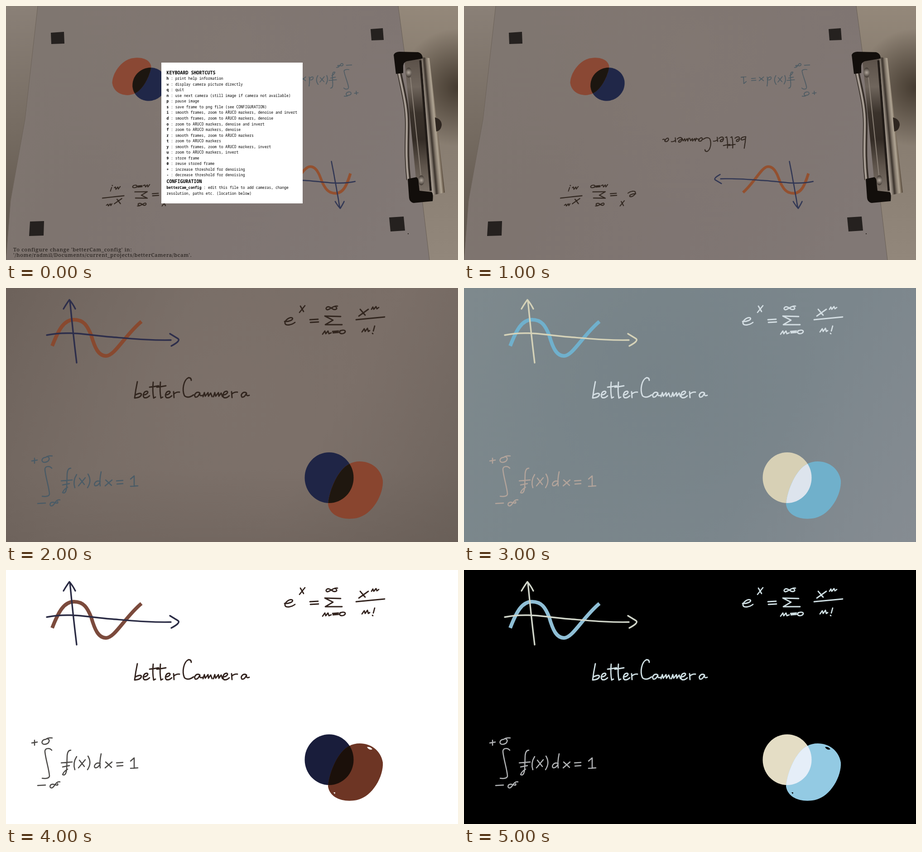
Write an HTML page with a canvas that moves like this. It is 998x561 px and loops after 6 s.

```html
<!DOCTYPE html>
<html lang="en">
<head>
<meta charset="utf-8">
<title>Whiteboard camera</title>
<style>
  html, body { margin: 0; width: 100%; height: 100%; overflow: hidden; background: #000; }
  canvas, svg { position: absolute; left: 0; top: 0; }
  #ink { transform-origin: 0 0; }
  text { white-space: pre; }
  .row { font: 500 8.03px "Noto Sans Mono", "DejaVu Sans Mono", monospace; fill: #000; }
  .head { font: bold 10px "Noto Sans Mono", "DejaVu Sans Mono", monospace; fill: #000; }
  .path { font: 11.5px "Noto Serif", "Liberation Serif", serif; letter-spacing: .7px; fill: #1c1714; }
  .key { font-weight: bold; }
</style>
</head>
<body>
<canvas id="back" width="998" height="561"></canvas>
<canvas id="ink" width="998" height="561"></canvas>
<svg id="help" width="998" height="561"></svg>
<script>
const W = 998, H = 561;
const backEl = document.getElementById('back');
const inkEl = document.getElementById('ink');
const help = document.getElementById('help');
const back = backEl.getContext('2d');
const ink = inkEl.getContext('2d');

// Where the four corners of the sheet appear in the camera picture
const sheet = [[846, 466], [86, 475], [128, 84], [806, 76]];

function perspective([[x0, y0], [x1, y1], [x2, y2], [x3, y3]]) {
  const dx1 = x1 - x2, dx2 = x3 - x2, sx = x0 - x1 + x2 - x3;
  const dy1 = y1 - y2, dy2 = y3 - y2, sy = y0 - y1 + y2 - y3;
  const den = dx1 * dy2 - dx2 * dy1;
  const g = (sx * dy2 - dx2 * sy) / den, h = (dx1 * sy - sx * dy1) / den;
  const m = [
    (x1 - x0 + g * x1) / W, (y1 - y0 + g * y1) / W, 0, g / W,
    (x3 - x0 + h * x3) / H, (y3 - y0 + h * y3) / H, 0, h / H,
    0, 0, 1, 0, x0, y0, 0, 1
  ];
  return `matrix3d(${m.map(v => v.toFixed(10)).join()})`;
}
const cameraView = perspective(sheet);

// Handwriting
const axes = 'M90 104C140 94 180 104 230 108S320 116 364 115M362 101L380 112Q386 117 365 128' +
  'M141 27Q148 100 156 165M127 46Q134 34 140 26Q147 34 153 46';
const wave = 'M102 128C116 92 128 70 150 70C172 70 180 84 188 104C196 132 204 150 221 150C240 150 262 105 299 74';
const series = [
  'M615 74C624 75 636 70 632 66C626 63 615 72 616 78C618 84 630 82 638 76',
  'M650 40L657 52M660 39L648 54M671 70L689 69M672 76L690 75',
  'M739 63L704 62L722 71L705 81L742 81',
  'M732 40C722 38 716 48 709 48C704 46 708 40 714 42C722 46 724 50 730 46Q731 42 726 41',
  'M699 102L704 95L706 101L711 95L713 101L718 99M721 96L734 95M722 99L734 98',
  'M738 94C732 102 746 103 749 97C750 92 741 92 737 96',
  'M782 47L793 60M800 47L779 62M807 47L810 42L812 47L817 41L819 46L823 43M773 70L836 64',
  'M786 97L791 90L793 96L798 89L800 96L803 94M814 84L811 95M809 100L810 101'
].join('');
const integral = [
  'M57 382L69 380M63 376L63 387M102 371Q92 370 88 374C78 374 76 386 86 385C96 384 98 374 92 373',
  'M101 398C96 392 85 393 86 402C88 420 95 440 96 455Q95 462 80 460',
  'M70 476L87 475M119 468C110 466 108 478 102 481C96 483 95 474 103 473C110 474 116 478 114 472',
  'M143 398Q136 398 135 410L134 440Q132 456 125 452Q128 444 136 440M122 426L146 424M125 435L140 432',
  'M156 412Q147 426 152 441M162 420L173 434M175 419L160 437M181 411Q190 426 180 441',
  'M210 406Q206 425 208 437M207 427C198 424 192 434 197 437Q204 437 208 428',
  'M220 424L233 436M234 424L219 437M244 426L258 425M245 433L258 432',
  'M275 422L283 415L283 438M275 438L291 437'
].join('');

// Letters start at x = 0 and are placed by offset
const letters = {
  b: 'M7 207Q3 226 1 243Q15 242 16 235Q15 230 3 236',
  e: 'M2 236C11 236 15 229 10 228C3 228 0 238 4 242Q10 244 16 238',
  t: 'M8 208Q6 228 9 243L13 241M0 219Q10 218 20 216',
  r: 'M1 229L2 242M2 234Q7 229 14 230',
  C: 'M21 204Q21 198 15 198C4 203 0 225 6 238Q14 245 26 236',
  a: 'M12 231C5 228 -1 236 3 241Q9 242 13 232Q12 240 19 237',
  m: 'M1 240L4 231L6 239L12 231L13 239L18 232L21 240'
};
const word = 'betterCammera';
const wordX = [283, 301, 317, 333, 350, 369, 388, 415, 434, 457, 477, 497, 518];

const disc = new Path2D();
disc.ellipse(713.5, 419, 54, 56, 0, 0, 7);
const blob = new Path2D('M711 478C713 448 732 402 757 389C785 374 826 388 832 425C834 455 810 500 775 508C745 514 715 504 711 478Z');
const glints = 'M797 391Q805 390 809 396Q802 399 797 391ZM723 491L727 491L726 495Z';

const stroke = (d, color, width, cap = 'round') => {
  ink.strokeStyle = color;
  ink.lineWidth = width;
  ink.lineCap = cap;
  ink.lineJoin = 'round';
  ink.stroke(new Path2D(d));
};

function drawInk(p) {
  ink.clearRect(0, 0, W, H);
  stroke(wave, p.wave, 8, 'butt');
  stroke(axes, p.axes, 3.4);
  stroke(series, p.text, 2.8);
  stroke(integral, p.integral, 2.5);
  [...word].forEach((c, i) => {
    ink.save();
    ink.translate(wordX[i], 0);
    stroke(letters[c], p.text, 2.9);
    ink.restore();
  });
  ink.fillStyle = p.disc;
  ink.fill(disc);
  ink.fillStyle = p.blob;
  ink.fill(blob);
  ink.save();
  ink.clip(disc);
  ink.fillStyle = p.both;
  ink.fill(blob);
  ink.restore();
  if (p.glint) {
    ink.fillStyle = p.glint;
    ink.fill(new Path2D(glints));
  }
}

// Backgrounds
const fill = (d, paint) => {
  back.fillStyle = paint;
  back.fill(new Path2D(d));
};
const line = (d, color, width) => {
  back.strokeStyle = color;
  back.lineWidth = width;
  back.stroke(new Path2D(d));
};
const withStops = (g, colors) => {
  colors.forEach((c, i) => g.addColorStop(i / (colors.length - 1), c));
  return g;
};
const linear = (x0, y0, x1, y1, ...colors) => withStops(back.createLinearGradient(x0, y0, x1, y1), colors);
const radial = (x, y, r, ...colors) => withStops(back.createRadialGradient(x, y, 0, x, y, r), colors);
const full = `M0 0H${W}V${H}H0Z`;

function drawClip() {
  fill('M880 122L922 116L948 412L908 410Z', linear(0, 120, 0, 410, '#5c524a', '#6f655c', '#3a322b', '#332b25', '#5d534a', '#7a7067'));
  line('M893 158L918 392', '#8a8076', 2);
  line('M915 120L938 408', '#211b17', 5);
  fill('M917 113L935 115L969 412L941 418Z',
    linear(926, 262, 958, 259, '#b3a99d', '#8f857a', '#3a322b', '#857a6d', '#b0a594', '#6a5c4c', '#2d2620'));
  fill('M947 246Q962 250 962 263Q960 276 950 277Z', '#2e2620');
  line('M868 145C877 190 886 220 886 260S883 330 889 384', '#38302a', 10);
  line('M867 145C876 190 885 220 885 260S882 330 888 384', '#a69c93', 4.5);
  for (const [x, y] of [[889, 147], [917, 385]]) {
    back.fillStyle = radial(x, y, 11, '#b0a69b', '#3a322c');
    back.beginPath();
    back.ellipse(x, y, 7, 11, 0, 0, 7);
    back.fill();
  }
  fill('M856 108Q858 102 868 101L910 102Q920 105 920 116L885 122Q878 124 877 132L877 148L861 150Z', '#120e0b');
  fill('M887 382L906 378Q911 380 911 390L913 408L940 411Q944 414 942 431L900 435Q891 433 890 424Z', '#120e0b');
}

function drawDesk() {
  const paper = 'M70 0H866L882 120L935 561H0L10 430L42 250Z';
  fill(full, linear(0, 0, 0, H, '#8a8077', '#756b61', '#5a5148'));
  fill('M860 0H998V561H925Z', linear(0, 0, 0, H, '#94887a', '#857a6d', '#8b8074', '#92877b'));
  fill('M860 0H998V561H925Z', radial(998, 180, 130, '#453b30', '#453b3000'));
  fill(paper, linear(120, 0, 820, H, '#7f7670', '#7e746f', '#7f7572', '#817875'));
  fill(paper, radial(500, 90, 430, '#857b7566', '#857b7500'));
  line('M70 0L42 250L10 430L0 561', '#6d635a', 1);
  line('M866 0L882 120L935 561', '#6a6057', 1);
  fill('M99 59L128 57L129 83L100 84Z', '#25211f');
  fill('M805 51L832 49L834 75L807 76Z', '#25211f');
  fill('M53 476L84 475L83 507L51 508Z', '#25211f');
  fill('M846 467L878 465L881 496L849 498Z', '#25211f');
  fill('M887 502h2v2h-2Z', '#2a231f');
  drawClip();
}

function drawSheet() {
  fill(full, linear(0, 0, W, H, '#6c615a', '#776c65', '#7a6e67', '#6d635c'));
  fill(full, radial(480, 240, 560, '#80746d88', '#80746d00'));
  fill(full, linear(0, H, 0, 400, '#62575055', '#62575000'));
}

function drawSlate() {
  fill(full, linear(0, 0, W, H, '#7e898d', '#7a868b', '#7b868c', '#868c92'));
  fill(full, radial(420, 200, 400, '#737f8588', '#737f8500'));
}

// Help window
function addText(cls, x, y, str, key = '') {
  const t = document.createElementNS(help.namespaceURI, 'text');
  t.setAttribute('class', cls);
  t.setAttribute('x', x);
  t.setAttribute('y', y);
  if (key) {
    const k = document.createElementNS(help.namespaceURI, 'tspan');
    k.setAttribute('class', 'key');
    k.textContent = key;
    t.append(k);
  }
  t.append(str);
  help.append(t);
}

function buildHelp() {
  const box = document.createElementNS(help.namespaceURI, 'rect');
  const size = { x: 343, y: 125, width: 312, height: 311, fill: '#fff' };
  for (const k in size) box.setAttribute(k, size[k]);
  help.append(box);
  const zoom = 'zoom to ARUCO markers', smooth = 'smooth frames, ' + zoom;
  const rows = [
    ['h', 'print help information'],
    ['w', 'display camera picture directly'],
    ['q', 'quit'],
    ['n', 'use next camera (still image if camera not available)'],
    ['p', 'pause image'],
    ['s', 'save frame to png file (see CONFIGURATION)'],
    ['i', smooth + ', denoise and invert'],
    ['d', smooth + ', denoise'],
    ['o', zoom + ', denoise and invert'],
    ['f', zoom + ', denoise'],
    ['r', smooth],
    ['t', zoom],
    ['y', smooth + ', invert'],
    ['u', zoom + ', invert'],
    ['9', 'store frame'],
    ['0', 'reuse stored frame'],
    ['+', 'increase threshold for denoising'],
    ['-', 'decrease threshold for denoising']
  ];
  addText('head', 354.5, 150.5, 'KEYBOARD SHORTCUTS');
  rows.forEach(([key, what], i) => {
    const y = 163.3 + i * 12.53;
    if (key === 'w') addText('row', 354.5, y, 'w : ' + what);
    else addText('row', 354.5, y, ' : ' + what, key);
  });
  addText('head', 354.5, 391, 'CONFIGURATION');
  addText('row', 354.5, 404, ' : edit this file to add cameras, change', 'betterCam_config');
  addText('row', 354.5, 416.5, 'resolution, paths etc. (location below)');
  addText('path', 16, 542, "To configure change 'betterCam_config' in:");
  addText('path', 16, 554, "'/home/radmil/Documents/current_projects/betterCamera/bcam'.");
}

const palette = (text, axes, wave, integral, disc, blob, both, glint) =>
  ({ text, axes, wave, integral, disc, blob, both, glint });
const photo = palette('#30261f', '#2f3553', '#93502f', '#4c5a62', '#202748', '#8a4834', '#1c1610');
const scan = palette('#32261f', '#2d2e4b', '#88492f', '#4a5b66', '#1f2546', '#89452f', '#1f170f');
const negative = palette('#d3dde2', '#d5d2b8', '#70b0cc', '#b3a49b', '#d7d0b5', '#70b0cb', '#dde4ed');
const clean = palette('#33241f', '#2a2b44', '#7b4a3c', '#4b4947', '#191d3b', '#6d3524', '#1b100a', '#fff');
const chalk = palette('#cedee2', '#d0d5c9', '#8fbfd6', '#b2b4b6', '#e4ddc5', '#93cae3', '#e5eef8', '#000');

const scenes = [
  { paint: drawDesk, ink: photo, camera: true, help: true },
  { paint: drawDesk, ink: photo, camera: true },
  { paint: drawSheet, ink: scan },
  { paint: drawSlate, ink: negative },
  { paint: () => fill(full, '#fff'), ink: clean },
  { paint: () => fill(full, '#000'), ink: chalk }
];

let shown = -1;
function show(i) {
  if (i === shown) return;
  shown = i;
  const s = scenes[i];
  s.paint();
  drawInk(s.ink);
  inkEl.style.transform = s.camera ? cameraView : 'none';
  help.style.display = s.help ? 'block' : 'none';
}

const start = performance.now();
function tick() {
  show(Math.floor((performance.now() - start) % 6000 / 1000));
  requestAnimationFrame(tick);
}
buildHelp();
show(0);
requestAnimationFrame(tick);
</script>
</body>
</html>
```
